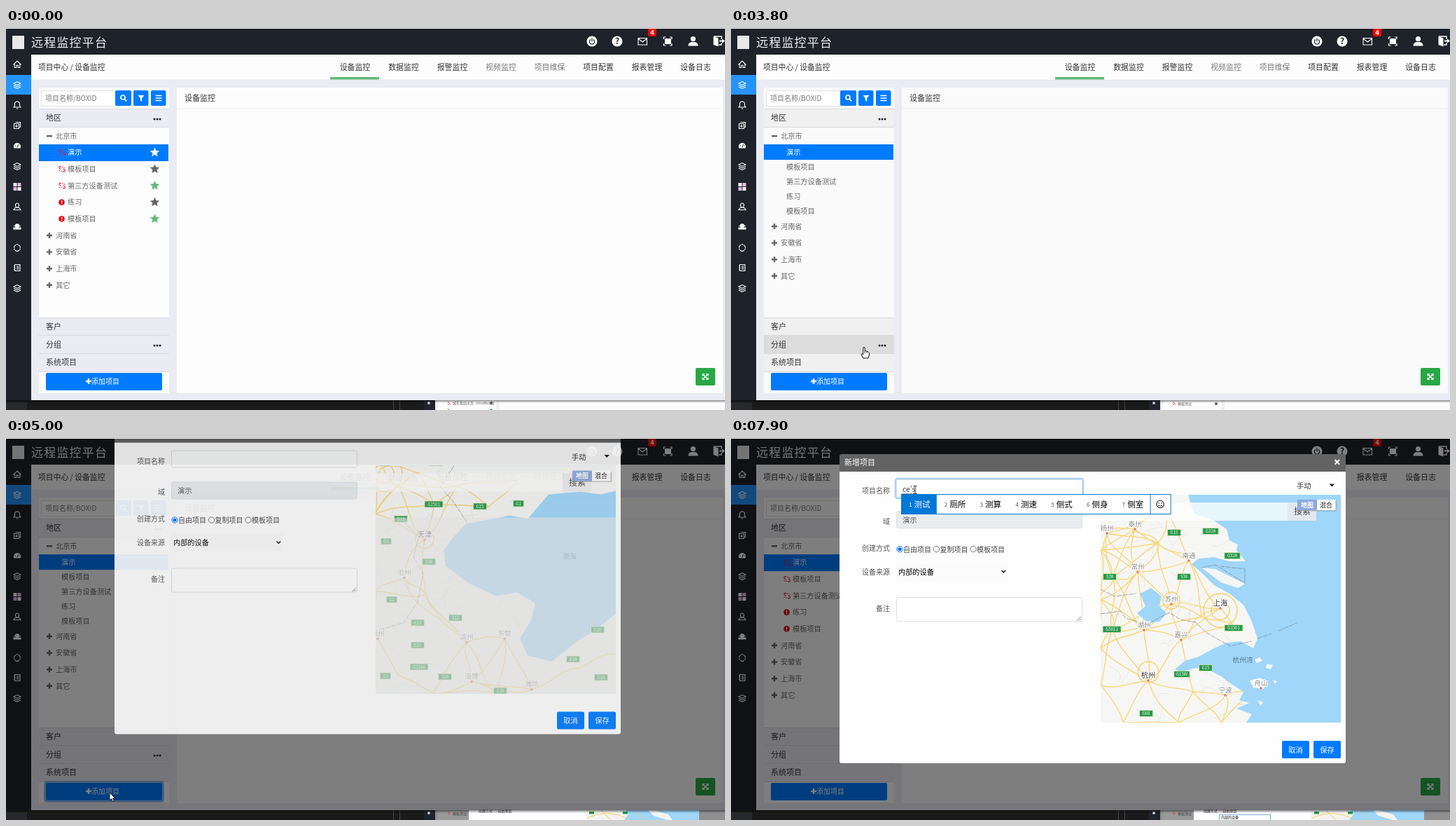
Write an HTML page that moves like this. It is 1027 px wide and 545 px high and loops after 8 s.

```html
<!DOCTYPE html>
<html lang="zh-CN">
<head>
<meta charset="utf-8">
<title>远程监控平台</title>
<style>
html, body { margin: 0; width: 100%; height: 100%; overflow: hidden; background: #191919; }
svg { display: block; width: 1027px; height: 545px; }
text { font-family: "Noto Sans CJK SC", "Noto Sans CJK", "Noto Sans", sans-serif; white-space: pre; }
.panel { fill: #fdfdfd; }
.head { fill: #ebebf4; }
.reloaded .panel { fill: #fafafa; }
.reloaded .head { fill: #f0f0f0; }
</style>
</head>
<body>
<svg id="stage" viewBox="0 0 1027 545" xmlns="http://www.w3.org/2000/svg"></svg>
<script>
const LOOP = 8000, STEP = 100;
const BLUE = '#007bff', DARK = '#1e222b', GREEN = '#5fb878', INK = '#333', MUTED = '#666';

// Markup helpers; text is placed by its vertical centre
const rect = (x, y, w, h, fill, more = '') => `<rect x="${x}" y="${y}" width="${w}" height="${h}" fill="${fill}" ${more}/>`;
const box = (x, y, w, h, cls) => `<rect class="${cls}" x="${x}" y="${y}" width="${w}" height="${h}"/>`;
const path = (d, stroke, width = 1, fill = 'none', more = '') =>
  `<path d="${d}" stroke="${stroke}" stroke-width="${width}" fill="${fill}" ${more}/>`;
const shape = (d, fill, more = '') => path(d, 'none', 0, fill, more);
const dot = (x, y, r, fill, more = '') => `<circle cx="${x}" cy="${y}" r="${r}" fill="${fill}" ${more}/>`;
const text = (x, cy, s, size = 11, fill = INK, more = '') =>
  `<text x="${x}" y="${cy + size * 0.37}" font-size="${size}" fill="${fill}" ${more}>${s}</text>`;
const group = (id, body, more = '') => `<g id="${id}" ${more}>${body}</g>`;
const at = (x, y, body) => `<g transform="translate(${x} ${y})">${body}</g>`;
const MID = 'text-anchor="middle"', END = 'text-anchor="end"', BOLD = 'font-weight="bold"';

const star = (x, y, r, fill) => {
  const pts = Array.from({ length: 10 }, (_, i) => {
    const a = i * Math.PI / 5, k = i % 2 ? r * 0.46 : r;
    return (x + k * Math.sin(a)).toFixed(1) + ' ' + (y - k * Math.cos(a)).toFixed(1);
  });
  return shape('M' + pts.join('L') + 'Z', fill);
};
const plus = (x, y, c) => path(`M${x - 4} ${y}h8M${x} ${y - 4}v8`, c, 2.4);
const dots = y => [212, 216, 220].map(x => dot(x, y, 1.5, '#222')).join('');

function seeded(n) {
  return () => (n = (n * 16807) % 2147483647) / 2147483647;
}

// ---- top bar, tabs ----
function topBar() {
  const w = '#fff';
  return rect(0, 0, 1027, 38, DARK) + rect(0, 0, 1027, 1, '#f4f4f4') +
    rect(9, 11, 17, 19, '#e8e8e8') +
    text(36, 21, '远程监控平台', 17, '#eee', 'letter-spacing="1.2"') +
    dot(837, 19, 7.5, w) + path('M835 16.5a3.6 3.6 0 1 0 4 0M837 14.5v4.5', DARK, 1.2) +
    dot(873, 19, 7.5, w) + text(873, 19, '?', 12, DARK, MID + BOLD) +
    path('M903 14.5h12.5v9.5h-12.5ZM903 15l6.2 5 6.3-5', w, 1.1) +
    rect(917, 1, 12, 11, '#f00', 'rx="2"') + text(923, 6.3, '4', 9.5, w, MID + BOLD) +
    rect(941, 15, 9, 8, w) + path('M939.5 16v-3h3M948 13h3v3M951 22v3h-3M942.5 25h-3v-3', w, 1.2) +
    dot(981.5, 15.5, 3.6, w) + shape('M974.5 25.5q0-5 5-5.5h4q5 .5 5 5.5Z', w) +
    shape('M1010.5 12l7 2.5v12l-7-2.5Z', w) + path('M1011 12h11v4M1022 21v3h-4', w, 1.4) + shape('M1019 17.5h4v-2l4 3-4 3v-2h-4Z', w);
}

const TABS = ['设备监控', '数据监控', '报警监控', '视频监控', '项目维保', '项目配置', '报表管理', '设备日志'];
const tabs = () => text(46, 56, '项目中心 / 设备监控', 10.8) +
  TABS.map((s, i) => text(498.5 + i * 69.5, 56, s, 10.9, i == 3 || i == 4 ? '#777' : INK, MID)).join('') +
  rect(463, 70, 70, 3.5, GREEN);

const dropdown = () => rect(878, 75, 75, 103, '#fff', 'stroke="#ccc" rx="2"') +
  ['数据报表', '报警报表', '报表模板', '历史报表'].map((s, i) => text(915.5, 86 + i * 25, s, 10.3, INK, MID)).join('');

// ---- left panel ----
const ROWS = ['演示', '模板项目', '第三方设备测试', '练习', '模板项目'];
const AREAS = ['河南省', '安徽省', '上海市', '其它'];

function rowIcon(i, y) {
  if (i > 2) return dot(79.5, y, 4.3, '#e60012') + rect(78.9, y - 2.8, 1.4, 3.4, '#fff') + rect(78.9, y + 1.4, 1.4, 1.4, '#fff');
  return at(80, y, path('M-1-2.5-2.2-3.7A1.6 1.6 0 0 0-4-1.6L-1.8.6M1 2.7 2.2 3.9A1.6 1.6 0 0 0 4.2 1.6L2-.6M1-3.6V-2M3-2h1.4M-1 3.8V2.4M-3 2.4h-1.4', '#f0142f', 1.1));
}
function tree(icons) {
  const gap = icons ? 23.7 : 21, first = icons ? 296 : 283;
  const stars = ['#fff', MUTED, GREEN, MUTED, GREEN];
  return rect(47, 166, 185, icons ? 24 : 22, BLUE) +
    rect(58, 153, 8, 2.4, MUTED) + text(71, 154, '北京市', 10.2, MUTED) +
    ROWS.map((s, i) => {
      const y = 177.5 + i * gap;
      return text(icons ? 88 : 79, y, s, 10.2, i ? MUTED : '#fff') +
        (icons ? rowIcon(i, y) + star(212.5, y, 7, stars[i]) : '');
    }).join('') +
    AREAS.map((s, i) => plus(62, first + i * 23.6, MUTED) + text(71, first + i * 23.6, s, 10.2, MUTED)).join('');
}
function leftPanel() {
  const line = y => rect(47, y, 186, 1, '#d9d9e0');
  return box(47, 85, 186, 436, 'panel') +
    rect(50.5, 89.5, 106, 22, '#fff', 'stroke="#e2e2e2"') + text(56, 100, '项目名称/BOXID', 10, '#777') +
    [156, 182, 207].map((x, i) => rect(x, 89, i ? 21.5 : 23, 22, BLUE, 'rx="2"')).join('') +
    dot(167, 99, 3, 'none', 'stroke="#fff" stroke-width="1.7"') + path('M169.2 101.4l3 3', '#fff', 2) +
    shape('M188.500 96h9l-3.300 4v5l-2.400-1.800v-3.200Z', '#fff') +
    path('M213.500 96.500h9M213.500 100h9M213.500 103.500h9', '#fff', 1.6) +
    box(47, 115, 186, 27, 'head') + line(115) + line(141) + text(57, 128, '地区') + dots(130) +
    box(47, 413, 186, 77, 'head') + group('hover', rect(47, 439, 186, 26, '#dcdcdc')) +
    [413, 438, 464, 490].map(line).join('') +
    text(57, 426, '客户') + text(57, 452, '分组') + dots(453) + text(57, 477, '系统项目') +
    group('iconTree', tree(true)) + group('plainTree', tree(false)) +
    group('ring', rect(55.5, 490.5, 169, 28, 'none', 'stroke="#80b8f5" stroke-width="2.500" rx="3"')) +
    rect(57, 492, 166, 25, BLUE, 'rx="2"') + plus(118, 504, '#fff') + text(122, 504.5, '添加项目', 10, '#fff');
}
const rightPanel = () => box(244, 85, 780, 436, 'panel') + rect(244, 114.5, 780, 1, '#ededf0') +
  text(255, 100, '设备监控') + rect(985, 485, 28, 25, '#28a745', 'rx="2"') +
  path('M996 494.500l6 6M1002 494.500l-6 6', '#fff', 1.6) +
  shape('M994.500 493h4l-4 4ZM1003.500 493h-4l4 4ZM994.500 502h4l-4-4ZM1003.500 502h-4l4-4Z', '#fff');

// ---- side menu ----
const LAYERS = 'M-5-2 0-4.500 5-2 0 .5ZM-5 .5 0 3 5 .5M-5 3 0 5.500 5 3';
const MENU = [
  ['我的主页', 'M-5.500 .5 0-5 5.500 .5M-3.800-1V4.500H-1.200V1.200H1.200V4.500H3.800V-1'],
  ['项目中心', LAYERS],
  ['报警管理', 'M-5 3H5L3.500 1V-1.500A3.500 3.500 0 0 0-3.500-1.500V1ZM-1.200 5H1.200M0-6V-5'],
  ['模板管理', 'M-4.500-2.500H2.500V4.500H-4.500ZM-2.500-4.500H4.500V2.500H2.500M-1-1V3M-3 1H1'],
  ['数据分析', 'M-4 3A4.500 4.500 0 1 1 4 3Z', '#fff'],
  ['维保中心', LAYERS],
  ['应用中心', ''],
  ['客户管理', 'M0-5A2.500 3 0 1 1 0 1A2.500 3 0 1 1 0-5M-5 4.500Q-4 1.500-1.500 1.200H1.500Q4 1.500 5 4.500Z'],
  ['企业管理', 'M0-4A2 2.200 0 1 1 0 0A2 2.200 0 1 1 0-4M-5-1.500H-3M3-1.500H5M-5 3V1H5V3Z', '#fff'],
  ['运营管理', 'M-4.300 1A4.300 4.300 0 0 1-1.500-3.500M1.500-3.500A4.300 4.300 0 0 1 4.300 1M3 4A4.500 4.500 0 0 1-3 4M-5 2.500h2M3 2.500h2M-1-4.500h2'],
  ['操作日志', 'M-3.500-4.500H4V4.500H-3.500ZM-1-2H2.500M-1 0H2.500M-1 2H2.500M-5-2.500H-3M-5 0H-3M-5 2.500H-3'],
  ['第三方设备接入', LAYERS]
];
function sideMenu() {
  const items = MENU.map(([name, d, fill], i) => {
    const y = 52 + i * 29;
    let icon = path(d, '#fff', 1.1, fill);
    if (i == 4) icon += path('M0 2.500L1.500-2M-3 0h1M2.500 0h1', DARK, 1);
    if (i == 6) icon = rect(-5.500, -5, 5, 5, '#fff') + rect(.5, -5, 5, 5, '#e9b7e6') + rect(-5.500, 1, 5, 5, '#e9b7e6') + rect(.5, 1, 5, 5, '#fff');
    return at(16, y, icon) + text(i == 4 ? 44 : 45.5, y + .5, name, 9.6, '#fff');
  }).join('');
  return `<clipPath id="menuClip"><rect id="menuBox" x="0" y="38" width="36" height="493"/></clipPath>` +
    group('menu', rect(0, 38, 144, 493, DARK) + rect(0, 67, 144, 28, '#2494fb') + items, 'clip-path="url(#menuClip)"');
}

// ---- maps ----
const FRAME = 'M528 81h343v325h-343Z';
const EAST = {
  land: 'M528 81H653L656 92 662 108 690 118 708 130 712 146 724 152 722 160 735 176 712 176 690 170 668 172 658 180 672 192 690 210 712 222 732 238 744 262 752 286 746 300 728 290 708 292 690 300 668 312 648 318 634 330 644 334 664 328 680 330 700 340 716 352 732 362 726 374 740 378 722 386 744 394 736 406H528Z',
  isles: 'M672 185 692 187 734 208 724 214 700 206ZM741 346 756 342 768 350 760 358 746 356ZM748 316l8-3 3 5-8 3ZM765 322l9 2-3 6-7-2ZM752 374l8 3-4 5ZM774 345l6 2-3 4Z',
  water: 'M584 222 600 214 615 226 612 240 622 250 612 262 596 264 580 250 592 240Z',
  border: 'M528 251l28-4 8 10 20 6 12 2 30-16 16 10 22 4 14 14 24 14 12 6M528 216l20 10 30-4M716 296l28-6M752 286l20-7M782 275l26-11M672 185l20-4 42 26v-20l-34-4',
  towns: [['扬州', 537, 128], ['泰州', 577, 122], ['南通', 654, 167], ['常州', 581, 183], ['苏州', 629, 229], ['上海', 699, 235, 1], ['湖州', 590, 266], ['嘉兴', 643, 280], ['杭州', 596, 338, 1], ['宁波', 706, 359], ['舟山', 757, 349]],
  hubs: [[528, 160], [528, 230], [528, 300], [528, 352], [560, 406], [640, 406], [700, 406], [620, 100], [610, 150], [672, 255], [720, 270], [660, 362], [545, 273], [545, 198]],
  signs: [['G2', 541, 83], ['G15', 587, 91], ['G15', 614, 83], ['G15', 633, 135], ['G328', 685, 133], ['G328', 716, 168], ['S38', 541, 198], ['S38', 647, 198], ['G5011', 544, 273], ['G1501', 718, 271], ['G15W', 644, 337], ['G15', 678, 328], ['G60', 593, 393]],
  rings: [[699, 246, 24], [699, 246, 13], [596, 334, 15], [629, 232, 12]],
  sea: ['杭州湾', 731, 316]
};
const NORTH = {
  land: FRAME + 'M657 164 640 182 625 202 628 224 660 248 700 267 730 262 756 277 750 302 734 327 745 352 780 360 815 332 840 317 871 292V117L850 122 820 118 775 122 745 157 720 152Z',
  isles: '', water: '',
  border: 'M560 155l30 26-8 30 14 24-8 40-20 30-40 12M640 81l-20 30 18 20 20 30',
  towns: [['天津', 598, 179, 1], ['沧州', 569, 233], ['滨州', 658, 325], ['东营', 712, 320], ['潍坊', 751, 392], ['淄博', 665, 381], ['德州', 531, 320]],
  hubs: [[536, 84], [560, 110], [585, 90], [612, 136], [645, 110], [690, 140], [730, 100], [528, 150], [528, 260], [560, 380], [610, 406], [700, 406], [820, 370], [871, 350], [620, 300], [600, 265]],
  signs: [['G2501', 611, 136], ['G25', 677, 139], ['G1', 732, 135], ['G18', 564, 157], ['G3', 543, 189], ['S38', 604, 218], ['G2', 551, 272], ['S12', 642, 298], ['G18', 588, 305], ['G25', 588, 337], ['G2516', 590, 368], ['G3', 542, 381], ['S29', 627, 382], ['G20', 706, 402], ['G18', 810, 357], ['G20', 845, 315], ['G18', 850, 383]],
  rings: [[540, 92, 14], [540, 92, 26], [598, 186, 13]],
  sea: ['渤海', 805, 210]
};
function mapView(id, m) {
  const rnd = seeded(77), nodes = m.towns.map(t => [t[1], t[2] + 8]).concat(m.hubs);
  const wob = n => (rnd() - .5) * n;
  let major = '', minor = '';
  nodes.forEach(([x, y], i) => nodes.slice(i + 1).forEach(([u, v]) => {
    const far = Math.hypot(u - x, v - y);
    if (far > 92) return;
    major += `M${x} ${y}C${x + (u - x) / 3 + wob(22)} ${y + (v - y) / 3 + wob(22)} ${x + (u - x) / 1.5 + wob(22)} ${y + (v - y) / 1.5 + wob(22)} ${u} ${v}`;
  }));
  for (let i = 0; i < 70; i++)
    minor += `M${528 + rnd() * 230} ${81 + rnd() * 320}q${wob(30)} ${wob(30)} ${wob(60)} ${wob(60)}`;
  const clip = `<clipPath id="${id}Land"><path d="${m.land}" clip-rule="evenodd"/></clipPath>`;
  const roads = path(minor, '#e3e6e6', .8) + path(major, '#f8d77c', 1.4) +
    m.rings.map(([x, y, r]) => dot(x, y, r, 'none', 'stroke="#f8d06a" stroke-width="1.400"')).join('');
  const signs = m.signs.map(([s, x, y]) => {
    const w = s.length * 3.600 + 8;
    return rect(x - w / 2, y - 4.5, w, 9, '#27994a', 'stroke="#dfe8b5" stroke-width=".8"') + text(x, y, s, 6, '#fff', MID);
  }).join('');
  const names = m.towns.map(([s, x, y, big]) => dot(x, y + 8, 2.2, '#e5796c', 'stroke="#fff" stroke-width=".6"') +
    text(x, y, s, big ? 10.3 : 9.6, big ? '#333' : '#8a8a8a', MID + ' stroke="#fff" stroke-width="2" paint-order="stroke"')).join('');
  return clip + group(id, shape(FRAME, '#9fd6f9') + shape(m.land, '#f6f6f4', 'fill-rule="evenodd"') +
    `<g clip-path="url(#${id}Land)">${roads}</g>` + shape(m.water, '#9fd6f9') + shape(m.isles, '#f4f6f4') +
    path(m.border, '#7d858b', .7, 'none', 'stroke-dasharray="7 1.500"') + signs + names +
    text(m.sea[1], m.sea[2], m.sea[0], 9.6, '#56788f', MID), 'clip-path="url(#mapClip)"');
}

// ---- dialog ----
function dialog() {
  const label = (y, s) => text(227, y, s, 10, '#555', END);
  const field = (y, h, fill) => rect(236.5, y + .5, 265, h, fill, 'stroke="#dcdfe2" rx="2"');
  const radio = (x, s, on) => dot(x, 158.5, 4.2, '#fff', `stroke="${on ? '#0075ff' : '#767676'}"`) +
    (on ? dot(x, 158.5, 2.6, '#0075ff') : '') + text(x + 5, 159, s, 10, '#444');
  const button = (x, s) => rect(x, 432, 39, 25, BLUE, 'rx="2"') + text(x + 19.5, 445, s, 10.3, '#fff', MID);
  const lower = label(119, '域') + field(104, 24, '#e9ecef') + text(245, 117, '演示', 10.3, '#555') +
    label(157, '创建方式') + radio(241, '自由项目', true) + radio(293.5, '复制项目') + radio(346, '模板项目') +
    label(191, '设备来源') + rect(236, 178, 159, 25, '#fbfbfb') + text(239, 191, '内部的设备', 10.2, '#000') + path('M386.500 189l2.800 2.800 2.800-2.800', '#111', 1.5) +
    label(243, '备注') + field(227, 34, '#fff') + path('M494.500 260.500l5.500-5.500M497.500 260.500l2.500-2.500', '#666', .8);
  return '<clipPath id="mapClip"><path d="' + FRAME + '"/></clipPath>' +
    shape('M155 48V26q0-3 3-3H875q3 0 3 3V48Z', '#636363') + shape('M155 48H878V461q0 3-3 3H158q-3 0-3-3Z', '#fefefe') +
    text(162, 34.5, '新增项目', 11, '#fff') + path('M862.500 31l6.500 6.500M869 31l-6.500 6.500', '#fff', 2.2) +
    label(75, '项目名称') + group('focus', rect(235, 58, 268, 28, '#fff', 'stroke="#a9d0fb" stroke-width="2.500" rx="3"')) + field(59, 24, '#fff') +
    group('lower', lower) +
    text(808, 68.5, '手动', 10.3) + shape('M854.500 65.500h7.500l-3.750 4Z', '#222') +
    mapView('east', EAST) + mapView('north', NORTH) +
    group('loading', rect(528, 155, 343, 251, '#eee', 'opacity=".6"')) +
    rect(528, 92, 267, 26, '#fff', 'opacity=".75"') + rect(795, 92, 41, 26, '#ececec', 'opacity=".88"') + text(816, 105, '搜索', 12, '#444', MID) +
    rect(810, 89.5, 55, 15, '#8b8b8b', 'opacity=".5"') + rect(809, 88, 28, 15, '#8ea8e0') + rect(837, 88, 26.5, 15, '#fff') +
    text(823, 95.5, '地图', 9, '#fff', MID + BOLD) + text(850, 95.5, '混合', 9, '#222', MID) +
    button(787, '取消') + button(832, '保存') +
    group('typed', '') + group('caret', rect(245, 66, 1, 12, '#222'));
}
function imePopup(id, words, step) {
  const w = words.length * step + 29, end = 243 + words.length * step;
  return group(id, rect(243.5, 80.5, w, 28, '#fff', 'stroke="#0078d7"') + rect(243, 80, step, 28.5, '#0078d7') +
    words.map((s, i) => {
      const x = 254 + i * step;
      return text(x, 95, i + 1, 8, i ? '#555' : '#fff') + text(x + 7.5, 94.5, s, 11.5, i ? '#000' : '#fff');
    }).join('') +
    rect(end, 80, 1, 28, '#0078d7') + dot(end + 14.500, 94.5, 5.2, 'none', 'stroke="#222" stroke-width="1.100"') +
    dot(end + 12.6, 93, .8, '#222') + dot(end + 16.4, 93, .8, '#222') + path(`M${end + 11.500} 96q3 2.500 6 0`, '#222'));
}

// ---- strip under the window ----
function strip() {
  const tiny = (x, y, s, c = '#666') => text(x, y, s, 5, c);
  const link = path('M631 533l4 4M631 536l2 2', '#e33', 1);
  const shade = '<linearGradient id="shade" x2="0" y2="1"><stop stop-color="#000" stop-opacity=".45"/><stop offset="1" stop-color="#000" stop-opacity="0"/></linearGradient>';
  return shade + rect(0, 531, 1027, 14, '#1a1a1a') + rect(0, 534, 30, 11, '#28292d') +
    rect(553, 531, 1, 14, '#444') + rect(562, 531, 1, 14, '#444') + rect(597, 531, 16, 14, '#20242d') + dot(604, 535, 2, '#ccc') +
    rect(613, 531, 414, 14, '#f0f0f5') + rect(617, 531, 83, 14, '#fdfdfd') + rect(705, 531, 322, 14, '#fdfdfd') +
    group('tinyA', link + tiny(638, 535, '城东泵站水务（modbus田') + star(693, 535, 3, '#555') + link.replace('<path', '<path transform="translate(0 10)"') + star(693, 545, 3, GREEN)) +
    group('tinyB', plus(625, 536, '#666').replace('stroke-width="2.4"', 'stroke-width="1"') + tiny(631, 536, '安徽省')) +
    group('tinyC', link + tiny(638, 536, '模板测试') + star(693, 536, 3, '#555')) +
    group('tinyD', rect(613, 531, 414, 14, '#8f8f8f') + rect(617, 531, 44, 14, '#999') + link + tiny(638, 536, '模板测试', '#444') +
      rect(661, 531, 329, 14, '#fefefe') + tiny(675, 532, '创建方式  ○自由项目', '#222') +
      rect(829, 531, 161, 14, '#f3f4f0') + shape('M885 531h32l8 8 20 6h-62l6-8ZM925 531h65v14h-38l-6-8Z', '#9fd6f9') +
      path('M830 542q30-14 60 2M850 531l14 14M900 531l10 14', '#f3cf70') + rect(833, 533, 7, 3.5, '#27994a') + rect(881, 533, 7, 3.5, '#27994a')) +
    group('tinyE', rect(697.5, 537.5, 73, 8, '#fff', 'stroke="#7fa9d8"') + tiny(700, 541.5, '内部的设备', '#111')) +
    rect(0, 531, 1027, 4, 'url(#shade)');
}

const pointer = {
  hand: shape('M-1.200 0Q0-1.200 1.200 0V5Q3 4 4 5.500 6 5 6.500 7 8 7 7.500 10L6 15H-1.500L-4 9.500Q-3.500 8-1.200 10Z', '#fff', 'style="stroke:#111;stroke-width:1"') +
    path('M1.200 5v3M4 5.500v2.500', '#111', .8),
  arrow: shape('M0 0V11L2.600 8.600 4.400 12.400 6.200 11.500 4.500 8H8Z', '#fff', 'style="stroke:#111;stroke-width:.9"'),
  beam: path('M-2.500-5.500h2l.5.5.5-.5h2M0-5V5M-2.500 5.500h2l.5-.5.5.5h2', '#222', 1)
};

const svg = document.getElementById('stage');
svg.innerHTML = '<clipPath id="window"><rect x="0" y="1" width="1027" height="530"/></clipPath>' +
  rect(0, 0, 1027, 531, '#ebebf5') + rect(36, 38, 991, 35.500, '#fdfdfd') + group('tabs', tabs()) +
  leftPanel() + rightPanel() + group('dropdown', dropdown()) + sideMenu() + topBar() +
  group('dim', rect(0, 1, 1027, 530, '#000')) +
  `<g clip-path="url(#window)">${group('dialog', dialog())}</g>` +
  imePopup('imeShort', [...'测册侧厕策恻廁'], 39.7) +
  imePopup('imeLong', ['测试', '厕所', '测算', '测速', '侧式', '侧身', '侧室'], 50.8) +
  strip() + Object.entries(pointer).map(([id, body]) => group(id, body)).join('');

// ---- motion ----
const $ = Object.fromEntries([...svg.querySelectorAll('[id]')].map(e => [e.id, e]));
const MOUSE = [[300, 912, 64], [500, 760, 84], [700, 338, 102], [900, 120, 92], [1100, 22, 78], [2600, 22, 78], [3000, 90, 190], [3300, 200, 380], [3600, 196, 440], [3800, 190, 456], [4000, 186, 475], [4400, 148, 506], [5500, 148, 506], [5800, 205, 330], [6100, 263, 74]];
const MENU_W = [[1100, 36], [1500, 144], [3100, 144], [3500, 36]];
const DIM = [[4600, 0], [4700, .2], [4800, .39], [4900, .5]];
const SLIDE = [[4900, -50], [5000, -41.500], [5100, -20], [5200, -6], [5300, 0]];
const FADE = [[4900, 0], [5000, .88], [5100, 1]];
const FOCUS = [[6200, 0], [6300, .35], [6400, .7], [6500, 1]];
const DROP = [[200, 0], [300, 1], [500, 1], [800, .05], [1900, .05], [2000, 0]];

function value(keys, t, k = 1) {
  if (t <= keys[0][0]) return keys[0][k];
  for (let i = 1; i < keys.length; i++) {
    const a = keys[i - 1], b = keys[i];
    if (t <= b[0]) return a[k] + (b[k] - a[k]) * (t - a[0]) / (b[0] - a[0]);
  }
  return keys[keys.length - 1][k];
}
const show = (id, on) => { $[id].style.display = on ? '' : 'none'; };
const fade = (id, v) => { $[id].style.opacity = v; };
const between = (t, a, b) => t >= a && t < b;

function draw(t) {
  const x = value(MOUSE, t), y = value(MOUSE, t, 2), w = value(MENU_W, t);
  svg.classList.toggle('reloaded', between(t, 2000, 4500));
  show('tabs', !between(t, 2000, 2100));
  show('iconTree', t < 2000 || t >= 5400);
  show('plainTree', between(t, 2200, 5400));
  fade('dropdown', value(DROP, t));
  $.menuBox.setAttribute('width', w);

  show('hover', between(t, 3600, 4300) && between(y, 439, 490));
  $.hover.setAttribute('transform', `translate(0 ${y < 465 ? 0 : 26})`);
  show('ring', between(t, 4500, 5400));

  fade('dim', value(DIM, t));
  show('dialog', t >= 5000);
  fade('dialog', value(FADE, t));
  $.dialog.setAttribute('transform', `translate(0 ${value(SLIDE, t)})`);
  show('north', t < 5200);
  show('loading', t < 5100);
  fade('focus', value(FOCUS, t));
  $.lower.setAttribute('transform', `translate(0 ${between(t, 7500, 7600) ? 14 : 0})`);

  const word = t >= 7900 ? "ce's" : t >= 7600 ? 'ce' : t >= 7500 ? 'c' : '';
  $.typed.innerHTML = word && text(245, 73, word, 10.3, '#444') +
    path(`M245 79.500h${word.length * 4.500}`, '#444', 1, 'none', 'stroke-dasharray="1.500 1"');
  show('caret', between(t, 6300, 6800) || between(t, 7300, 7500));
  show('imeShort', between(t, 7500, 7900));
  show('imeLong', t >= 7900);

  show('tinyA', t < 100);
  show('tinyB', between(t, 100, 1800));
  show('tinyC', between(t, 1800, 4700));
  show('tinyD', t >= 4700);
  show('tinyE', t >= 7300);

  const kind = t >= 6100 ? 'beam' : t < 4700 && (t >= 3300 || x < w) ? 'hand' : 'arrow';
  for (const id in pointer) {
    show(id, t >= 300 && id == kind);
    $[id].setAttribute('transform', `translate(${x} ${y})`);
  }
}

const start = performance.now();
function tick() {
  const t = (performance.now() - start) % LOOP;
  draw(Math.floor(t / STEP) * STEP);
  requestAnimationFrame(tick);
}
tick();
</script>
</body>
</html>
```
